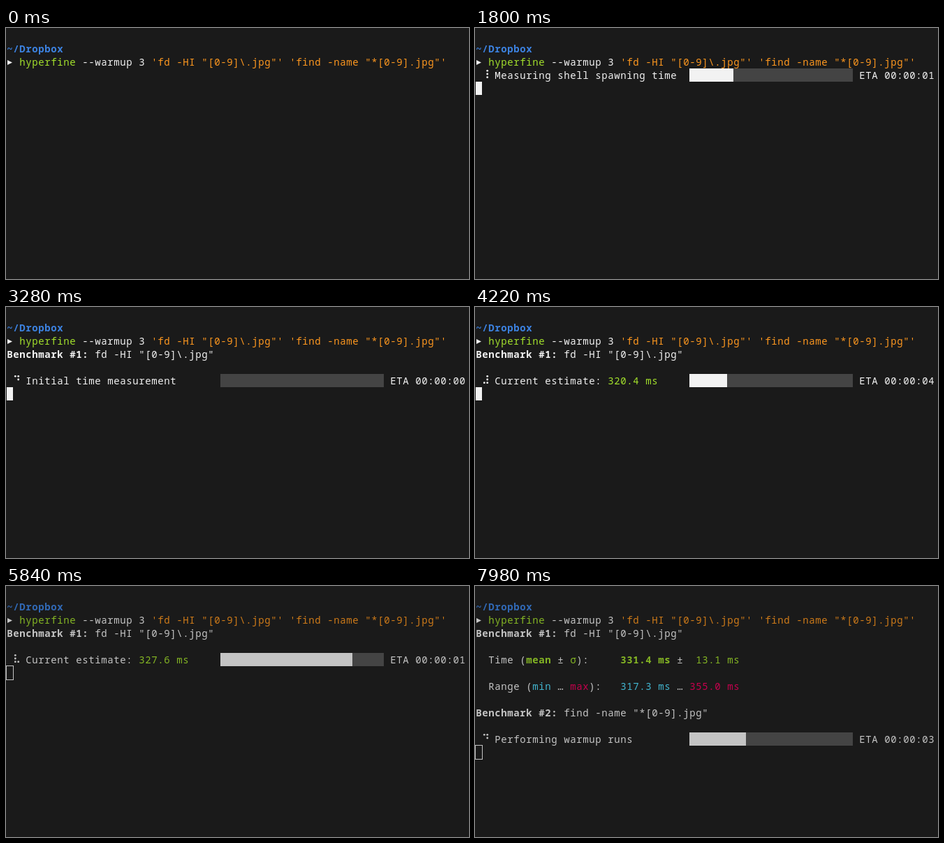
An HTML page with a canvas for the animation above (8000 ms loop, 663 px wide and 360 px high).

```html
<!DOCTYPE html>
<html lang="en">
<head>
<meta charset="utf-8">
<title>Terminal benchmark</title>
<style>
  html, body { margin: 0; width: 100%; height: 100%; overflow: hidden; background: #1a1a1a; }
  canvas { display: block; width: 663px; height: 360px; }
</style>
</head>
<body>
<canvas id="term" width="663" height="360"></canvas>
<script>
const ctx = document.getElementById('term').getContext('2d');
const LOOP = 8000, CW = 9, CH = 19;
const FONT = '14px "Noto Sans Mono", "DejaVu Sans Mono", monospace';
const COLORS = {
  fg: [242, 242, 242], blue: [60, 130, 224], green: [163, 224, 44],
  orange: [253, 151, 31], cyan: [82, 223, 255], pink: [244, 0, 95]
};
const SPINNER = '⠋⠙⠹⠸⠼⠴⠦⠧⠇⠏';

// Phase starts
const ENTER = 1610, SHELL = 1630, WARM = 2220, FIRST = 3205, RUNS = 3530, SECOND = 6450;
const FD = 324, FIND = 1525, BLUR = 5400, BLINK = 575;
const ESTIMATES = [318.9, 319.6, 320.4, 319.8, 321.5, 325.2, 324.1, 327.6, 329.3];
const RUN_ETA = [0, 3, 4, 3, 3, 2, 1, 1, 0];

let dim = false;
const x = col => 1 + col * CW;
const y = row => 1 + row * CH;

function color(name) {
  return 'rgb(' + COLORS[name].map(v => Math.round(v * (dim ? 0.81 : 1))).join() + ')';
}

function box(col, row, cols, fill) {
  ctx.fillStyle = fill;
  ctx.fillRect(x(col), y(row), cols * CW, CH);
}

// One glyph per terminal cell
function put(col, row, text, name = 'fg', bold = false) {
  ctx.font = (bold ? 'bold ' : '500 ') + FONT;
  ctx.fillStyle = color(name);
  for (const ch of text) {
    if (ch !== ' ') ctx.fillText(ch, x(col) + CW / 2, y(row) + 15);
    col++;
  }
  return col;
}

// Writes [text, color, bold] spans one after another
function line(row, ...spans) {
  spans.reduce((col, span) => put(col, row, ...span), 0);
}

function spinner(row, index) {
  const bits = SPINNER.charCodeAt(index % 10) - 0x2800;
  ctx.fillStyle = color('fg');
  for (let i = 0; i < 6; i++) {
    if (!(bits >> i & 1)) continue;
    ctx.beginPath();
    ctx.arc(i < 3 ? 13.3 : 17.7, y(row) + 3.3 + (i % 3) * 4.7, 1.4, 0, Math.PI * 2);
    ctx.fill();
  }
}

function progress(row, tick, msg, done, total, eta) {
  spinner(row, tick);
  put(3, row, msg);
  const cells = done > 0 ? Math.min(26, Math.floor(done / total * 26) + 1) : 0;
  box(34, row, 26, '#444444');
  box(34, row, cells, color('fg'));
  put(61, row, 'ETA 00:00:0' + Math.floor(eta));
}

function cursor(row, col, on) {
  if (dim) {
    ctx.strokeStyle = color('fg');
    ctx.lineWidth = 1;
    ctx.strokeRect(x(col) - 0.5, y(row) - 0.5, CW + 1, CH + 1);
  } else if (on) {
    box(col, row, 1, color('fg'));
  }
}

function prompt() {
  line(1, ['~/Dropbox', 'blue', true]);
  ctx.fillStyle = color('fg');
  ctx.beginPath();
  ctx.moveTo(2, 46);
  ctx.lineTo(9, 49.5);
  ctx.lineTo(2, 53);
  ctx.fill();
  line(2, ['  '], ['hyperfine', 'green'], [' --warmup 3 '],
    [`'fd -HI "[0-9]\\.jpg"' 'find -name "*[0-9].jpg"'`, 'orange']);
}

function results() {
  line(5, ['  Time ('], ['mean', 'green', true], [' ± '], ['σ', 'green'], ['):     '],
    ['331.4 ms', 'green', true], [' ±  '], ['13.1 ms', 'green']);
  line(7, ['  Range ('], ['min', 'cyan'], [' … '], ['max', 'pink'], ['):   '],
    ['317.3 ms', 'cyan'], [' … '], ['355.0 ms', 'pink']);
  line(9, ['Benchmark #2:', 'fg', true], [' find -name "*[0-9].jpg"']);
}

function draw(t) {
  const ticks = (start, step = 77) => Math.floor((t - start) / step);
  dim = t >= BLUR;
  ctx.fillStyle = '#1a1a1a';
  ctx.fillRect(0, 0, 663, 360);
  ctx.textAlign = 'center';
  prompt();

  if (t < ENTER) {
    cursor(2, 70, Math.floor((t + 410) / 600) % 2 === 1);
    return;
  }
  const on = Math.floor((t - ENTER) / BLINK) % 2 === 0;
  if (t < SHELL) {
    cursor(3, 0, on);
    return;
  }
  if (t < WARM) {
    const step = Math.max(0, ticks(1650, 50)) * 50;
    const done = Math.floor(step / 570 * 50);
    progress(3, ticks(SHELL, 56), 'Measuring shell spawning time', done, 50,
      done ? (50 - done) * 0.03 : 0);
    cursor(4, 0, on);
    return;
  }

  line(3, ['Benchmark #1:', 'fg', true], [' fd -HI "[0-9]\\.jpg"']);
  if (t < FIRST) {
    const done = ticks(WARM, 330);
    progress(5, ticks(WARM), 'Performing warmup runs', done, 3, done ? (3 - done) * 0.6 : 0);
  } else if (t < RUNS) {
    progress(5, ticks(FIRST, 75), 'Initial time measurement', 0, 9, 0);
  } else if (t < SECOND) {
    const done = Math.min(8, ticks(RUNS, FD));
    progress(5, ticks(FIRST, 70), 'Current estimate: ', done, 9, RUN_ETA[done]);
    put(21, 5, ESTIMATES[done].toFixed(1) + ' ms', 'green');
  } else {
    results();
    const done = ticks(SECOND, FIND);
    progress(11, ticks(SECOND, 76) + done, 'Performing warmup runs', done, 3,
      done ? (3 - done) * FIND / 1000 : 0);
  }
  cursor(t < SECOND ? 6 : 12, 0, on);
}

const began = performance.now();
function frame() {
  draw((performance.now() - began) % LOOP);
  requestAnimationFrame(frame);
}
frame();
</script>
</body>
</html>
```
